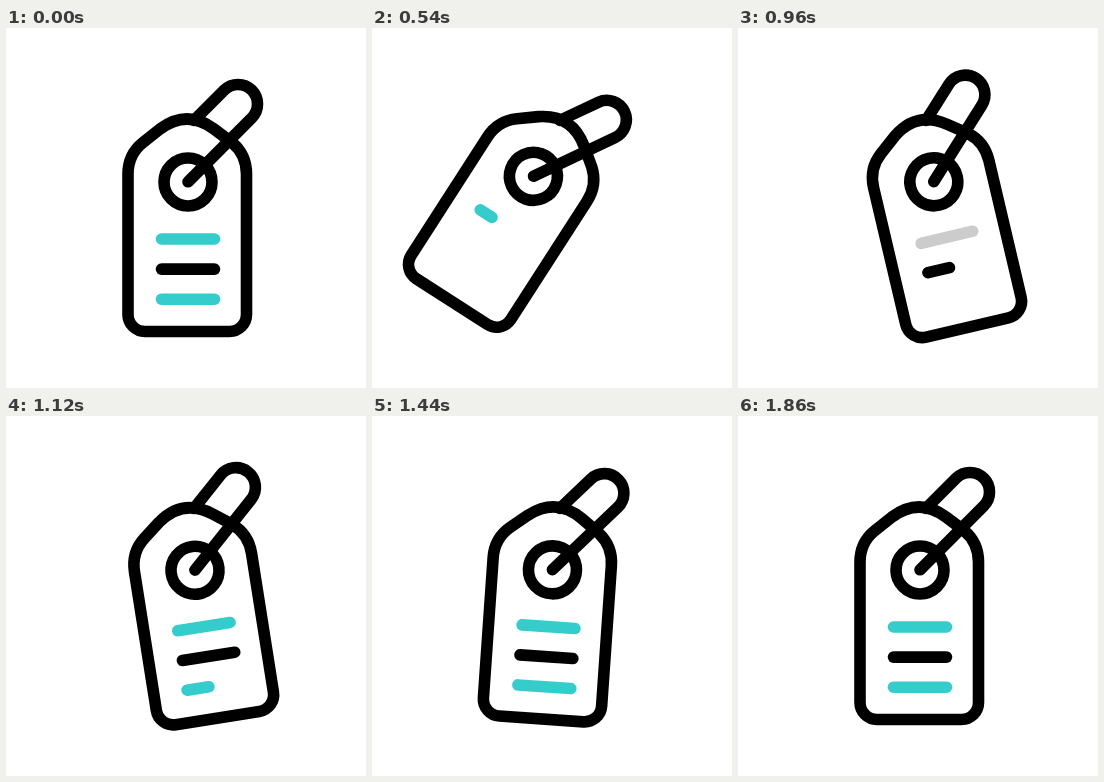
An HTML page that plays this animation: 360 by 360 pixels, repeating every 2.4 s.

```html
<!DOCTYPE html>
<html lang="en">
<head>
<meta charset="utf-8">
<title>Swinging tag</title>
<style>
  html, body { margin: 0; height: 100%; overflow: hidden; background: #fff; }
  svg { display: block; width: 100vw; height: 100vh; }
  svg * { fill: none; stroke-width: 11.6; stroke-linecap: round; stroke-linejoin: round; }
</style>
</head>
<body>
<svg viewBox="0 0 360 360" stroke="#000">
  <g id="string">
    <path d="M188 92.4L218.2 62.2A19.5 19.5 0 0 1 245.8 89.8L182 153.8"/>
    <circle cx="182" cy="154" r="24"/>
  </g>
  <g id="tag">
    <path d="M122 286.5V146Q122 126.5 137 114.5L154 101Q181 81 208 101L226 114.5Q240.5 126.5 240.5 146V286.5A17 17 0 0 1 223.5 303.5H139A17 17 0 0 1 122 286.5Z"/>
    <path class="line"/>
    <path class="line"/>
    <path class="line"/>
  </g>
</svg>
<script>
const LOOP = 2400, STEP = 20;
const PIVOT = [188, 92], RING = [182, 154];
const TEAL = '#35cccc', GREY = '#ccc';

// Turning points of the swing: [time in ms, clockwise degrees]
const stringTurns = [[0, 0], [670, 23], [1000, -15.8], [1265, 5.5], [1600, -2.2], [1860, 0]];
const tagTurns = [[20, 0], [680, 39], [1015, -20], [1290, 11.5], [1600, -4.2], [1860, 0]];

const GROW = 240, STAGGER = 160, LEFT = 155.5, LENGTH = 53;

const string = document.getElementById('string');
const tag = document.getElementById('tag');
const lines = document.querySelectorAll('.line');

const clamp = v => Math.min(1, Math.max(0, v));
// Halfway between a steady turn and a sine ease.
const ease = u => (u + (1 - Math.cos(Math.PI * u)) / 2) / 2;

// Add up the eased move from each turning point to the next.
function angle(turns, t) {
  return turns.slice(1).reduce((sum, [end, value], i) => {
    const [start, from] = turns[i];
    return sum + (value - from) * ease(clamp((t - start) / (end - start)));
  }, 0);
}

function draw(t) {
  const swing = angle(stringTurns, t), tilt = angle(tagTurns, t);
  const turn = `rotate(${swing} ${PIVOT})`;
  string.setAttribute('transform', turn);
  // The tag hangs from the ring, which the string carries along.
  tag.setAttribute('transform', `${turn} rotate(${tilt - swing} ${RING})`);

  const accent = t >= 560 && t < 1100 ? GREY : TEAL;
  lines.forEach((line, i) => {
    // Shrink to the left end from the bottom line up, then grow back from the top down.
    const shrunk = clamp((t - 363 + i * STAGGER) / GROW);
    const grown = clamp((t - 700 - i * STAGGER) / GROW);
    const size = 1 - shrunk + grown;
    line.setAttribute('d', size > 0.01 ? `M${LEFT} ${211 + 30.1 * i}h${LENGTH * size}` : '');
    line.setAttribute('stroke', i === 1 ? '#000' : accent);
  });
}

function tick() {
  const t = performance.now() % LOOP;
  draw(Math.floor(t / STEP) * STEP);
  requestAnimationFrame(tick);
}
tick();
</script>
</body>
</html>
```
